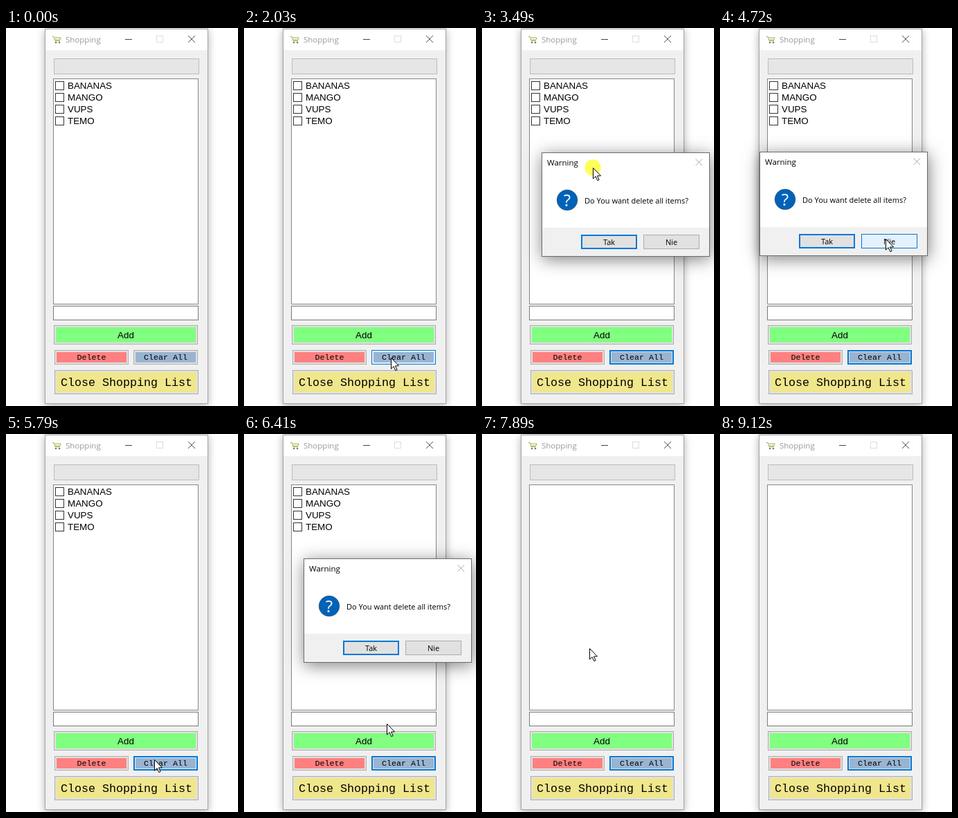
Write an HTML page that moves like this. It is 335x547 px and loops after 9200 ms.

```html
<!DOCTYPE html>
<html lang="en">
<head>
<meta charset="utf-8">
<title>Shopping list</title>
<style>
html, body { margin: 0; width: 335px; height: 547px; overflow: hidden; background: #fff; }
svg { display: block; }
text { white-space: pre; }
.ui { font-family: "Open Sans", "Noto Sans", sans-serif; }
.item { font: 13.4px "Liberation Sans", Arial, sans-serif; }
.mono { font-family: "Liberation Mono", "Courier New", monospace; }
.mid { text-anchor: middle; }
.winShade { filter: drop-shadow(0 2px 6px rgba(0,0,0,.32)); }
.dlgShade { filter: drop-shadow(1px 4px 12px rgba(0,0,0,.5)); }
</style>
</head>
<body>
<svg id="stage" width="335" height="547" viewBox="0 0 335 547"></svg>
<script>
const LOOP = 9200, STEP = 76.5, BLUE = '#0078d7', GREY = '#adadad';
const stage = document.getElementById('stage');
const $ = id => document.getElementById(id);
const clamp = v => Math.max(0, Math.min(1, v));

// Rectangle whose border lies inside its bounds
const box = (x, y, w, h, fill, line, more = '') => line
  ? `<rect x="${x + .5}" y="${y + .5}" width="${w - 1}" height="${h - 1}" fill="${fill}" stroke="${line}" ${more}/>`
  : `<rect x="${x}" y="${y}" width="${w}" height="${h}" fill="${fill}" ${more}/>`;
const text = (x, y, str, cls, size, fill = '#000') =>
  `<text x="${x}" y="${y}" class="${cls}" fill="${fill}" ${size ? `font-size="${size}"` : ''}>${str}</text>`;
const line = (d, color) => `<path d="${d}" fill="none" stroke="${color}"/>`;

const buttons = [
  { id: 'add', x: 69, y: 430, w: 208, h: 28, fill: '#80ff80', label: 'Add', cls: 'item', base: 449 },
  { id: 'del', x: 70, y: 466, w: 107, h: 21, fill: '#ff8080', label: 'Delete', cls: 'mono', size: 11.67, base: 480 },
  { id: 'clear', x: 184, y: 466, w: 93, h: 21, fill: '#99b4d1', label: 'Clear All', cls: 'mono', size: 11.67, base: 480 },
  { id: 'close', x: 70, y: 495, w: 208, h: 35, fill: '#f0e68c', label: 'Close Shopping List', cls: 'mono', size: 16.67, base: 518 },
  { id: 'yes', x: 57, y: 119, w: 81, h: 21, label: 'Tak', cls: 'ui', size: 11, base: 134, modal: true },
  { id: 'no', x: 147, y: 119, w: 81, h: 21, label: 'Nie', cls: 'ui', size: 11, base: 134, modal: true }
];
const button = b => box(b.x, b.y, b.w, b.h, '#e1e1e1', GREY, `id="${b.id}"`) +
  (b.fill ? box(b.x + 3, b.y + 3, b.w - 6, b.h - 6, b.fill) : '') +
  text(b.x + b.w / 2, b.base, b.label, b.cls + ' mid', b.size);

const items = ['BANANAS', 'MANGO', 'VUPS', 'TEMO'].map((name, i) =>
  box(71, 77 + 17 * i, 13, 13, '#fff', '#333') + text(89, 88 + 17 * i, name, 'item')).join('');

stage.innerHTML =
  box(56, 1, 236, 543, '#f0f0f0', '#a3a3a3', 'class="winShade"') +
  box(57, 2, 234, 30, '#fff') +
  line('M67 12.5h2l2 6h7M70 14h9l-1 3h-7', '#a5ad4a') +
  '<circle cx="72" cy="21" r="1.3" fill="#777"/><circle cx="77" cy="21" r="1.3" fill="#777"/>' +
  text(86, 21, 'Shopping', 'ui', 11.5, '#999') +
  line('M172 16.5h10', '#444') +
  box(217, 11, 10, 10, 'none', '#ddd') +
  line('M263 11l10 10M273 11l-10 10', '#555') +
  box(69, 44, 210, 23, '#e6e6e6', '#bcbcbc') +
  box(68, 73, 210, 327, '#fff', '#828790') +
  `<g id="items">${items}</g>` +
  box(68, 402, 210, 21, '#fff', '#7a7a7a', 'id="entry"') +
  buttons.filter(b => !b.modal).map(button).join('') +
  '<g id="dialog">' +
  box(0, 0, 243, 151, '#fff', '#6b6b6b', 'class="dlgShade"') +
  box(1, 109, 241, 41, '#f0f0f0') +
  text(8, 19, 'Warning', 'ui', 11.5) +
  line('M222.5 9.5l9.5 9.5M232 9.5l-9.5 9.5', '#aaa') +
  '<circle cx="37" cy="69" r="14.8" fill="#0063b8" stroke="#2d4f78" stroke-width=".8"/>' +
  text(37, 78, '?', 'ui mid', 24, '#fff') +
  text(62, 74, 'Do You want delete all items?', 'ui', 11) +
  buttons.filter(b => b.modal).map(button).join('') +
  '</g>' +
  '<g id="pointer"><circle id="press" r="11.7" fill="#ff0" opacity=".65"/>' +
  '<path d="M.5.5v15.6l3.6-3.4 2.7 6 2.3-1-2.6-5.8h5z" fill="#fff" stroke="#000"/></g>';

const eases = {
  both: p => p * p * (3 - 2 * p),
  in: p => p * p,
  out: p => p * (2 - p),
  none: p => p
};
// Pointer moves: start time, number of steps, end x, end y, ease
const moves = [
  [1080, 8, 212, 477, 'out'],
  [2870, 5, 204, 419, 'in'],
  [3260, 4, 160, 202, 'out'],
  [3640, 2, 131, 201, 'none'],
  [4180, 8, 239, 305, 'both'],
  [5104, 5, 214, 471, 'both'],
  [6100, 5, 206, 419, 'in'],
  [6490, 2, 133, 194, 'out'],
  [6640, 1, 104, 193, 'none'],
  [7030, 7, 155, 310, 'both'],
  [8270, 3, 145, 620, 'none']
];
const presses = [[1950, 2030], [3490, 4180], [4950, 5030], [5560, 5640], [6565, 7030], [7660, 7740]];
// Dialog: opening, closing, start of drag, steps of drag
const dialogs = [[2260, 5030, 3640, 2], [5870, 7740, 6640, 1]];

const progress = (t, start, n) => t < start ? 0 : clamp((Math.floor((t - start) / STEP) + 1) / n);

function pointerAt(t) {
  let x = 216, y = 560;
  for (const [start, n, toX, toY, ease] of moves) {
    const p = eases[ease](progress(t, start, n));
    x += (toX - x) * p;
    y += (toY - y) * p;
  }
  return [Math.round(x), Math.round(y)];
}

function frame(b, color, width, fill) {
  const attrs = { x: b.x + width / 2, y: b.y + width / 2, width: b.w - width, height: b.h - width,
    stroke: color, 'stroke-width': width, fill };
  for (const k in attrs) $(b.id).setAttribute(k, attrs[k]);
}

function draw(t) {
  const [px, py] = pointerAt(t);
  $('pointer').setAttribute('transform', `translate(${px} ${py})`);
  $('press').style.display = presses.some(([a, b]) => t >= a && t < b) ? '' : 'none';

  let alpha = 0, dx = 86, dy = 180;
  for (const [open, shut, drag, n] of dialogs) {
    if (t < open) continue;
    alpha = progress(t, open, 3) * (1 - progress(t, shut, 2));
    const p = progress(t, drag, n);
    dx = Math.round(86 - 29 * p);
    dy = Math.round(180 - p);
  }
  const scale = .9 + .1 * alpha;
  $('dialog').setAttribute('transform',
    `translate(${dx + 121.5 * (1 - scale)} ${dy + 75.5 * (1 - scale)}) scale(${scale})`);
  $('dialog').style.opacity = alpha;
  $('dialog').style.display = alpha ? '' : 'none';

  for (const b of buttons) {
    const x = px - (b.modal ? dx : 0), y = py - (b.modal ? dy : 0);
    const hover = !!b.modal === alpha > 0 && x >= b.x && x < b.x + b.w && y >= b.y && y < b.y + b.h;
    const focus = b.id === 'yes' || b.id === 'clear' && t >= 2260;
    frame(b, hover || focus ? BLUE : GREY, focus ? 2 : 1, hover ? '#e5f1fb' : '#e1e1e1');
  }

  $('items').style.display = t < 7815 ? '' : 'none';
  const shade = t < 8270 ? 122 : Math.round(23 + 99 * clamp(Math.floor((t - 8347) / 153 + 1) / 5));
  $('entry').setAttribute('stroke', `rgb(${shade},${shade},${shade})`);
}

function tick() {
  draw(performance.now() % LOOP);
  requestAnimationFrame(tick);
}
tick();
</script>
</body>
</html>
```
